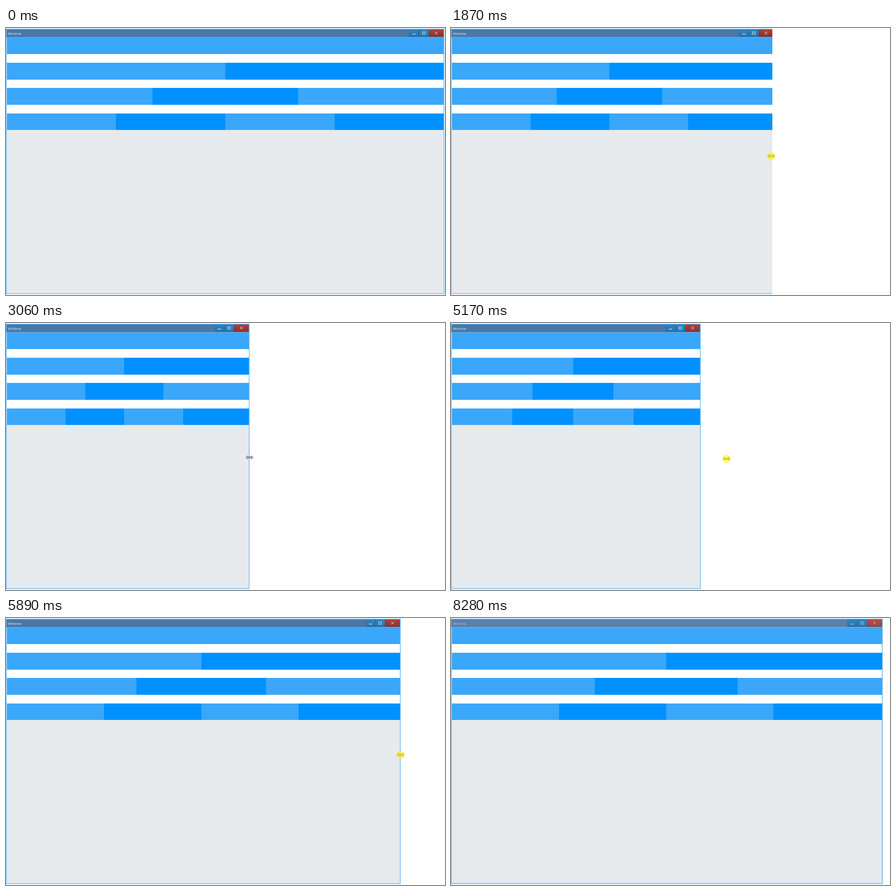
Animation, 959 px wide and 584 px high, one loop 8360 ms. Source, as an HTML page with a canvas:

```html
<!DOCTYPE html>
<html lang="en">
<head>
<meta charset="utf-8">
<title>Responsive window</title>
<style>
  html, body { margin: 0; width: 100%; height: 100%; overflow: hidden; background: #fff; }
  canvas { display: block; }
</style>
</head>
<body>
<canvas id="stage" width="959" height="584"></canvas>
<script>
const ctx = document.getElementById('stage').getContext('2d');
const LOOP = 8360;
const TICK = 79; // every move advances in steps of this many ms
const LEFT = 1.5;

// Start of each phase, in ms.
const APPEAR = 620, PRESS = 1020, SHRINK = 1260, RELEASE = 2980, WANDER = 3840, RETURN = 4080,
  PRESS_AGAIN = 4930, GROW = 5170, SETTLE = 6940, LEAVE = 7490, GONE = 8040, BLUR = 8280;
const SHRINK_TICKS = 20, GROW_TICKS = 21, RETURN_TICKS = 9, LEAVE_TICKS = 7;

const move = (start, ticks, from, to, power = 1) => ({ start, ticks, from, to, power });

const edgeMoves = [
  move(SHRINK, SHRINK_TICKS, 956.5, 529, 1.77),
  move(RELEASE, 1, 529, 531),
  move(GROW, GROW_TICKS, 544.5, 947, 2.76),
  move(SETTLE, 3, 946, 942),
];
const layoutMoves = [
  move(0, 1, 956.5, 956.5),
  move(SHRINK, SHRINK_TICKS, 949, 515, 1.77),
  move(GROW, GROW_TICKS, 532, 938.5, 2.76),
];
const cursorXMoves = [
  move(APPEAR, 1, 958, 957),
  move(SHRINK, SHRINK_TICKS, 950, 529, 1.77),
  move(RELEASE, 1, 529, 532),
  move(WANDER, 1, 555, 575),
  move(RETURN, RETURN_TICKS, 575, 531),
  move(GROW, GROW_TICKS, 602, 947, 2.5),
  move(SETTLE, 3, 946, 942),
  move(LEAVE, LEAVE_TICKS, 942, 913),
];
const cursorYMoves = [
  move(SHRINK, SHRINK_TICKS, 268.5, 294, 1.2),
  move(WANDER, 1, 291, 291),
  move(RETURN, RETURN_TICKS, 291, 294),
  move(GROW, GROW_TICKS, 297, 302),
  move(LEAVE, LEAVE_TICKS, 302, 590),
];

// Value of the latest move that has begun, eased out by its power.
function valueAt(moves, time) {
  const { start, ticks, from, to, power } = moves.findLast(m => m.start <= time) || moves[0];
  const tick = Math.max(0, Math.floor((time - start) / TICK + 0.3));
  const rest = 1 - Math.min(1, tick / ticks);
  return to + (from - to) * rest ** power;
}

const between = (time, from, to) => time >= from && time < to;

function rect(color, x, y, w, h) {
  ctx.fillStyle = color;
  ctx.fillRect(x, y, w, h);
}

function gradient(y0, y1, ...colors) {
  const g = ctx.createLinearGradient(0, y0, 0, y1);
  colors.forEach((color, i) => g.addColorStop(i / (colors.length - 1), color));
  return g;
}

function strokeRect(color, width, x, y, w, h) {
  ctx.strokeStyle = color;
  ctx.lineWidth = width;
  ctx.strokeRect(x, y, w, h);
}

function drawButton(x, w, ...colors) {
  rect(gradient(3, 19, ...colors), x, 3, w, 15.8);
  strokeRect('rgba(25,55,100,.4)', 0.7, x, 3, w, 15.8);
}

function drawTitleBar(right, active) {
  rect(active ? '#4878aa' : '#5b80a9', 1, 3, right - 1, 17.6);
  ctx.fillStyle = active ? '#dce6ef' : '#a9bccf';
  ctx.font = '7.6px "Noto Sans", sans-serif';
  ctx.fillText('Window', 4.3, 14.8);

  for (const offset of [75.5, 54.2]) drawButton(right - offset, 21, '#3384bf', '#1f78b5');
  drawButton(right - 32.8, 32.3, ...(active ? ['#ac433d', '#912d2b'] : ['#b54e49', '#9d4140']));

  const ink = active ? '#e6eff6' : '#bed2e2';
  rect(ink, right - 68.3, 12.7, 6.6, 1.3);
  strokeRect(ink, 1, right - 46.4, 8.7, 5.6, 4.8);
  ctx.beginPath();
  for (const side of [-1, 1]) {
    ctx.moveTo(right - 16.8 - 3.1 * side, 8);
    ctx.lineTo(right - 16.8 + 3.1 * side, 14.2);
  }
  ctx.stroke();
}

function drawRows(right, layoutEdge) {
  for (let row = 0; row < 4; row++) {
    const columnWidth = (layoutEdge - LEFT) / (row + 1);
    const top = Math.round(20.6 + row * 55.33);
    const bottom = Math.round(57.3 + row * 55.33);
    for (let col = 0; col <= row; col++) {
      const x = Math.round(LEFT + col * columnWidth);
      rect(col % 2 ? '#0091ff' : '#3aa7fb', x, top, right - x, bottom - top);
    }
  }
}

// While shrinking, the frame is painted slightly wider than the window and gets cut off.
function drawWindow(edge, layoutEdge, shrinking, active) {
  const right = shrinking ? edge + 3 : edge;
  ctx.save();
  ctx.beginPath();
  ctx.rect(0, 0, shrinking ? edge : 959, 584);
  ctx.clip();
  strokeRect('rgba(90,175,240,.22)', 4, 0.5, 2.5, right - 0.5, 578.5);
  rect('#fff', LEFT, 20, right - LEFT, 204);
  rect('#e6eaed', LEFT, 223, right - LEFT, 357);
  drawRows(right, layoutEdge);
  drawTitleBar(right, active);
  strokeRect(active ? '#55b2f7' : '#4f9fd8', 1.1, 0.8, 2.6, right - 0.8, 578);
  ctx.restore();
}

function drawCursor(x, y, onEdge, pressed) {
  const shape = onEdge
    ? 'M-7.8 0l3.5-3.4v2.3h8.6v-2.3l3.5 3.4l-3.5 3.4v-2.3h-8.6v2.3z'
    : 'M0 0v13l3-2.8l2.2 5.1l2.1-.9l-2.2-4.9h4.3z';
  const path = new Path2D(shape);
  ctx.save();
  ctx.translate(x, y);
  ctx.fillStyle = '#fff';
  ctx.fill(path);
  ctx.strokeStyle = '#111';
  ctx.lineWidth = 0.9;
  ctx.stroke(path);
  if (pressed) {
    ctx.fillStyle = 'rgba(255,242,10,.6)';
    ctx.beginPath();
    ctx.arc(0, 0, 8.8, 0, Math.PI * 2);
    ctx.fill();
  }
  ctx.restore();
}

function render(time) {
  const edge = valueAt(edgeMoves, time);
  const shrinking = between(time, SHRINK, SHRINK + SHRINK_TICKS * TICK);
  rect('#fff', 0, 0, 959, 584);
  drawWindow(edge, valueAt(layoutMoves, time), shrinking, time < BLUR);

  if (between(time, APPEAR, GONE)) {
    const x = valueAt(cursorXMoves, time);
    const pressed = between(time, PRESS, RELEASE) || between(time, PRESS_AGAIN, SETTLE + TICK);
    drawCursor(x, valueAt(cursorYMoves, time), pressed || Math.abs(x - edge) < 6, pressed);
  }
}

const start = performance.now();
function loop() {
  render((performance.now() - start) % LOOP);
  requestAnimationFrame(loop);
}
loop();
</script>
</body>
</html>
```
